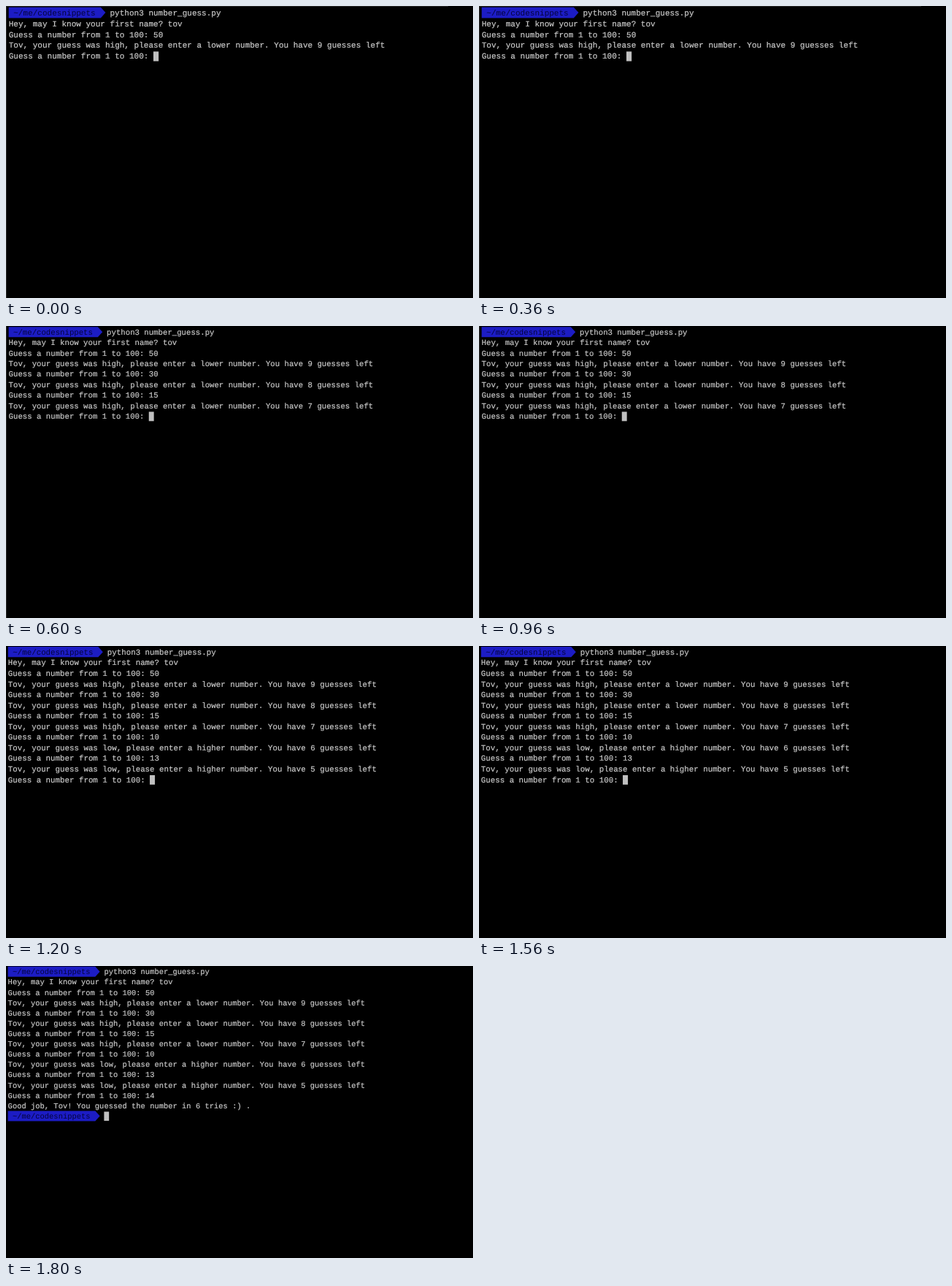
Write an HTML page that moves like this. It is 640x400 px and loops after 2.4 s.

```html
<!DOCTYPE html>
<html lang="en">
<head>
<meta charset="utf-8">
<title>Number guess</title>
<style>
  html, body { margin: 0; width: 100%; height: 100%; overflow: hidden; background: #000; }
  svg { display: block; width: 100%; height: 100%; }
  text {
    font: 20px "Liberation Mono", "Courier New", monospace;
    fill: #c7c7c7;
    stroke: #c7c7c7;
    stroke-width: .4px;
    white-space: pre;
    text-rendering: geometricPrecision;
  }
  .path { fill: #04043c; stroke: none; }
  .tag { fill: #1c1cc4; }
  .cursor { fill: #c0c0c0; }
  .edge { fill: #262626; }
</style>
</head>
<body>
<svg id="stage" viewBox="0 0 640 400"></svg>
<script>
const CELL = 12, ROW = 27, HOLD = 600, PROMPT_COLS = 21;
const ASK = "Guess a number from 1 to 100: ";
const stage = document.getElementById("stage");

// Transcript: a "$" line starts with the shell prompt.
const hint = (level, way, left) =>
  `Tov, your guess was ${level}, please enter a ${way} number. You have ${left} guesses left`;
const lines = ["$python3 number_guess.py", "Hey, may I know your first name? tov"];
[50, 30, 15, 10, 13].forEach((guess, i) => lines.push(
  ASK + guess,
  i < 3 ? hint("high", "lower", 9 - i) : hint("low", "higher", 9 - i)
));
lines.push(ASK + 14, "Good job, Tov! You guessed the number in 6 tries :) .", "$");

// Each screen has its own zoom: left edge, first baseline, cell width, row of the cursor.
const screens = [
  { x: 3.7, y: 12.8, cell: 6.61, last: 4, left: 1, top: 606 },
  { x: 3.6, y: 11.8, cell: 6.405, last: 8, left: 1 },
  { x: 2.8, y: 11.8, cell: 6.475, last: 12 },
  { x: 2.6, y: 11.3, cell: 6.275, last: 14 }
];

function add(parent, tag, attrs, text) {
  const node = document.createElementNS("http://www.w3.org/2000/svg", tag);
  for (const key in attrs) node.setAttribute(key, attrs[key]);
  if (text) node.textContent = text;
  return parent.appendChild(node);
}

function drawLine(parent, line, row) {
  const y = row * ROW;
  if (line[0] !== "$") {
    add(parent, "text", { x: 0, y }, line);
    return line.length;
  }
  add(parent, "path", { class: "tag", d: `M0 ${y - 20}H229l12 13.3l-12 13.3H0z` });
  add(parent, "text", { class: "path", x: CELL, y }, "~/me/codesnippets");
  add(parent, "text", { x: PROMPT_COLS * CELL, y }, line.slice(1));
  return PROMPT_COLS + line.length - 1;
}

const views = screens.map(({ x, y, cell, last, left, top }) => {
  const view = add(stage, "g", {});
  if (left) add(view, "rect", { class: "edge", width: 1, height: 400 });
  if (top) add(view, "rect", { class: "edge", width: top, height: 1 });

  const term = add(view, "g", { transform: `translate(${x} ${y}) scale(${cell / CELL})` });
  lines.slice(0, last).forEach((line, row) => drawLine(term, line, row));
  const open = lines[last].slice(0, ASK.length);
  const col = drawLine(term, open, last);
  add(term, "rect", { class: "cursor", x: col * CELL, y: last * ROW - 18, width: 13, height: 24 });
  return view;
});

function render() {
  const current = Math.floor(performance.now() / HOLD) % views.length;
  views.forEach((view, i) => { view.style.display = i === current ? "" : "none"; });
  requestAnimationFrame(render);
}
render();
</script>
</body>
</html>
```
